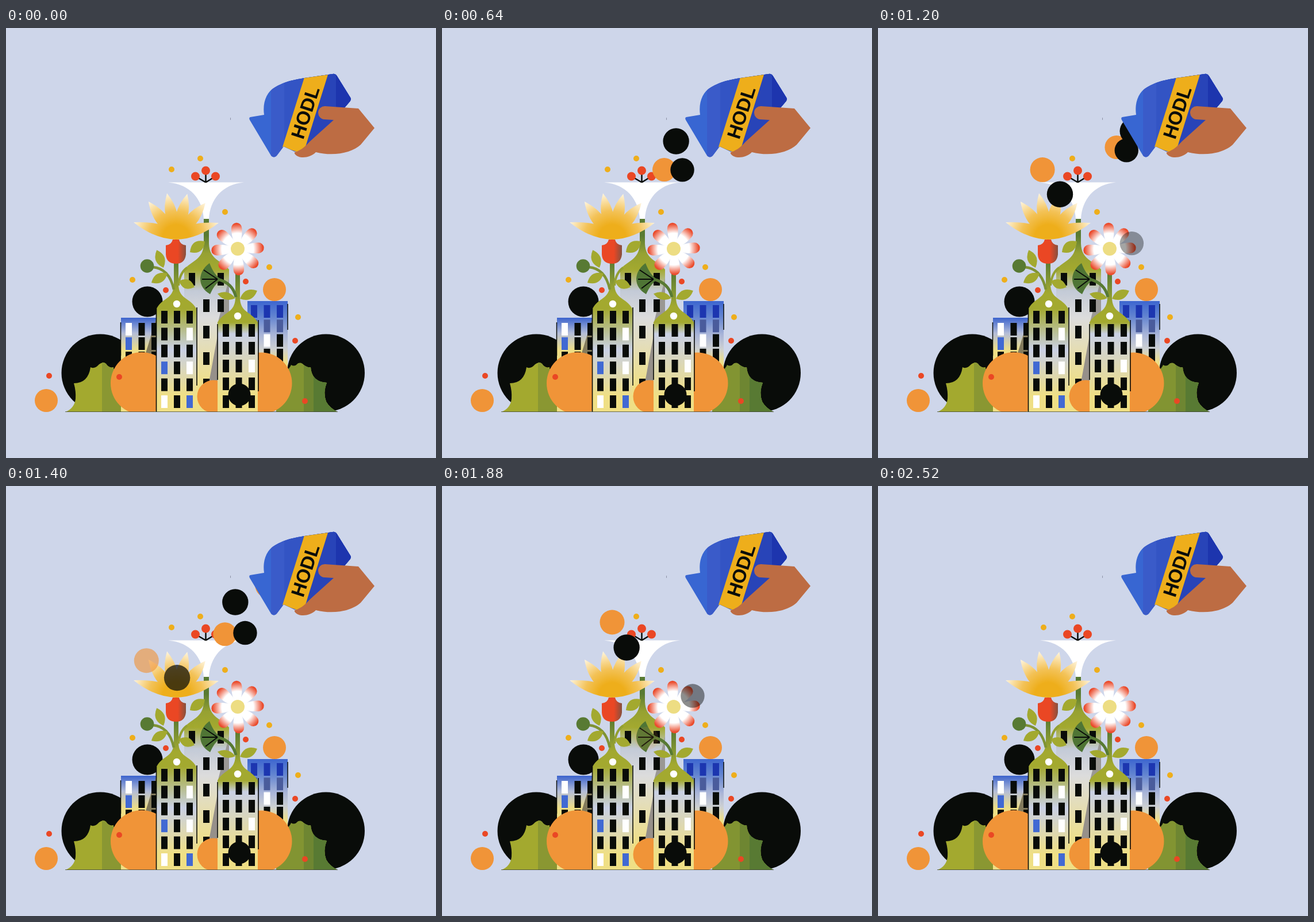
An HTML page that plays this animation: 748x748 px, repeating every 2.64 s.

```html
<!DOCTYPE html>
<html lang="en">
<head>
<meta charset="utf-8">
<title>Growing city</title>
<style>
html, body { margin: 0; width: 100%; height: 100%; overflow: hidden; background: #ced6ea; }
svg { display: block; width: 100vw; height: 100vh; }
text { font: bold 33px "Liberation Sans", Arial, sans-serif; }
</style>
</head>
<body>
<svg viewBox="0 0 748 748">
  <defs>
    <clipPath id="ground"><path d="M0 0H748V668H0Z"/></clipPath>
    <clipPath id="bag"><path d="M425 155L449 151C446 130 453 111 468 103C483 94 500 90 519 87L568 80Q573 79 576 84L599 121Q601 124 598 128L575 155L535 200L518 215Q505 217 498 213L483 206L471 222Q466 227 461 222L424 160Q422 156 425 155Z"/></clipPath>
    <radialGradient id="sun" gradientUnits="userSpaceOnUse" cx="0" cy="0" r="80">
      <stop offset=".3" stop-color="#eeae1b"/><stop offset=".6" stop-color="#f3c257"/><stop offset="1" stop-color="#fff6e0"/>
    </radialGradient>
    <radialGradient id="daisy" gradientUnits="userSpaceOnUse" cx="0" cy="0" r="46">
      <stop offset=".6" stop-color="#fff"/><stop offset=".95" stop-color="#ea4b2c"/>
    </radialGradient>
    <linearGradient id="calyx">
      <stop offset=".6" stop-color="#ea4724"/><stop offset="1" stop-color="#86503f"/>
    </linearGradient>
  </defs>

  <path d="M390.5 156V160" stroke="#8d94a8"/>
  <g id="scene" clip-path="url(#ground)"></g>
  <g id="coins"></g>

  <g clip-path="url(#bag)">
    <path d="M420 70H610V230H420Z" fill="#3866d2"/>
    <path d="M461 70H610V230H461Z" fill="#3a5bc9"/>
    <path d="M484 70H610V230H484Z" fill="#3354c4"/>
    <path d="M540 70H610V230H520Z" fill="#2844b8"/>
    <path d="M574 70H610V230H574Z" fill="#1d35ae"/>
    <path d="M519 86L561 78L517 219L481 207Z" fill="#eeae1b"/>
  </g>
  <text transform="translate(520.5 147) rotate(-72)" y="11.5" text-anchor="middle" fill="#0a0d0a">HODL</text>
  <path d="M555 136L613 140L641 174L617 203C602 217 570 224 539 216C530 225 516 227 507 223Q501 219 502 216C516 212 522 204 530 196L570 160L554 159A11.5 11.5 0 0 1 555 136Z" fill="#bd6c43"/>
</svg>
<script>
const BLACK = '#090c09', WHITE = '#fff', ORANGE = '#f09438', RED = '#ea4724', GOLD = '#eeae1b',
  OLIVE = '#a3a92f', GREEN = '#587a33', BLUE = '#4169d3', NAVY = '#1c36b0', SLATE = '#4a5c9c',
  CREAM = '#efdf85', HAZE = '#c9d0e4';

let art = '';
const path = (d, fill, place = '') => art += `<path d="${d}" fill="${fill}" transform="${place}"/>`;
const line = (d, color, width) => art += `<path d="${d}" fill="none" stroke="${color}" stroke-width="${width}"/>`;
const disc = (x, y, r, fill) => art += `<circle cx="${x}" cy="${y}" r="${r}" fill="${fill}"/>`;
const box = (x, y, w, h, fill) => path(`M${x} ${y}h${w}v${h}h${-w}Z`, fill);

// Vertical gradient from [y, colour] stops.
let fades = 0;
function fade(...stops) {
  const id = 'fade' + fades++, top = stops[0][0], bottom = stops.at(-1)[0];
  art += `<linearGradient id="${id}" gradientUnits="userSpaceOnUse" x1="0" x2="0" y1="${top}" y2="${bottom}">` +
    stops.map(([y, c]) => `<stop offset="${(y - top) / (bottom - top)}" stop-color="${c}"/>`).join('') + '</linearGradient>';
  return `url(#${id})`;
}

// Three columns of windows; paint(column, row) picks the colour, null leaves a gap.
function windows(x, y, dx, dy, rows, paint) {
  for (let i = 0; i < rows * 3; i++) {
    const c = i % 3, r = (i - c) / 3, fill = paint(c, r);
    if (fill) box(x + c * dx, y + r * dy, 11, 22, fill);
  }
}

// Pointed oval with its lower tip at (x, y), turned clockwise from upright.
function leaf(x, y, length, turn, width = 16, fill = OLIVE) {
  path(`M0 0Q${width} ${-length / 2} 0 ${-length}Q${-width} ${-length / 2} 0 0Z`, fill, `translate(${x} ${y}) rotate(${turn})`);
}

// Wall with a neck that flares out of a stem of half-width 4.
function house(x, w, mid, stem, neck, eave, light) {
  path(`M${mid - 4} ${stem}h8V${neck}C${mid + 5} ${eave - 16} ${mid + 24} ${eave - 19} ${x + w} ${eave}V668H${x}V${eave}` +
    `C${mid - 24} ${eave - 19} ${mid - 5} ${eave - 16} ${mid - 4} ${neck}Z`,
    fade([stem, GREEN], [neck, '#8f9d32'], [neck + 15, OLIVE], [eave, OLIVE], [light, HAZE], [640, CREAM]));
}

disc(164, 600, 67.5, BLACK);
disc(556.5, 600, 67.5, BLACK);

// Rear buildings
box(200, 504, 62, 164, fade([504, '#3b63cd'], [531, '#b4bdd8'], [561, CREAM]));
path('M262 504V575H240Z', '#827a5c');
windows(208, 513, 22.5, 25, 3, (c, r) => c ? BLACK : [WHITE, BLUE, BLACK][r]);
line('M199.5 512V570', BLACK, 1.5);
box(420, 475, 70, 120, fade([475, '#3d66d0'], [500, '#5f82d0'], [533, '#a8b4d8'], [558, '#cdd0d2'], [582, CREAM]));
windows(426, 482, 22.5, 25.3, 4, (c, r) => [NAVY, SLATE, c === 1 ? WHITE : BLACK, BLACK][r]);
line('M490 480V525', BLACK, 1.5);

// Bushes and the coins on them
path('M103 668Q119 662 121 645Q122 632 118 618Q143 618 147 590Q154 594 162 585Q168 580 174 584Q179 592 187 590V668Z', OLIVE);
path('M167 582Q171 581 174 584Q179 593 200 595V668H167Z', '#8a9732');
const edge = 'Q532 616 558 617Q551 634 557 650Q563 661 577 668';
path('M470 668V600Q490 600 496 586Q502 590 507 584Q513 580 518 586Q524 591 530 590' + edge + 'Z', '#829432');
path('M518 586Q524 591 530 590' + edge + 'H518Z', '#6e8632');
path('M535 606Q542 616 558 617Q551 634 557 650Q563 661 577 668H535Z', GREEN);
disc(236, 618, 54, ORANGE);
disc(444, 618, 53.5, ORANGE);

// Tower with its funnel and berries
path('M344 330H353V375C354 404 376 405 388 420V668H310V420C322 405 343 404 344 375Z',
  fade([330, GREEN], [361, GREEN], [392, '#96a132'], [420, OLIVE], [457, '#c3cad7'], [504, '#dcdcdc'], [625, CREAM]));
path('M388 435V515H368Z', '#9a9894');
path('M368 535V625L352 622Z', '#96908a');
windows(318, 426, 25, 46, 5, (c, r) => c === (r ? 0 : 1) ? null : BLACK);
disc(361, 641, 28.5, ORANGE);
path('M282 268.5H414C376 272 355 298 353 332H344C342 298 321 272 282 268.5Z', WHITE);
for (const [x, y] of [[329.5, 258], [347.5, 248], [364.5, 258]]) {
  line(`M347.5 268.5L${x} ${y}`, BLACK, 2.5);
  disc(x, y, 7.5, RED);
}
leaf(320, 390, 32, 54, 18);

// Front buildings
disc(246, 476, 26.5, BLACK);
disc(467, 455, 20, ORANGE);
house(262, 69, 296, 405, 447, 488, 560);
windows(270, 492, 22, 29.4, 6, (c, r) => r % 2 && c !== 1 && c + r > 2 ? (c === r - 3 ? BLUE : WHITE) : BLACK);
line('M261.5 488V668M332 486V622', BLACK, 1.6);
disc(297, 480, 6.2, WHITE);
house(368, 70, 403, 425, 470, 512, 532);
windows(377, 515, 22.5, 31, 5, (c, r) => c === 2 && r === 2 ? WHITE : BLACK);
line('M368 515V612M439 508V632', BLACK, 1.6);
disc(403, 501, 6.2, WHITE);
disc(406, 638, 19.5, BLACK);
disc(70, 648, 20, ORANGE);

// Twigs and leaves
line('M255 416Q284 418 292 455', '#7f9334', 4.5);
line('M300 448Q302 426 315 417', '#93a032', 4);
disc(245.5, 414, 11.8, GREEN);
leaf(274, 417, 33, -21);
leaf(253, 443, 32, 60);
leaf(301, 440, 29, 112);
leaf(407, 471, 33, 65);
leaf(399, 470, 32, -76, 13);
line('M368 437Q394 443 400 468', GREEN, 5);
path('M354 409Q362 430 374 437Q362 447 355 463Q338 453 338 436Q339 420 354 409Z', '#4f7535');
line('M368 437L344 421M368 437L341 437M368 437L347 453', BLACK, 2);

// Yellow flower
for (let i = 0; i < 4; i++) leaf(296, 366, 80, i * 25.5 - 37, 21, 'url(#sun)');
path('M-74 -28Q-28 -30 0 -14Q28 -30 74 -27Q38 1 0 2Q-38 1 -74 -28Z', 'url(#sun)', 'translate(296 366)');
path('M290 368H301Q303 377 313 378V394Q311 410 296 410Q279 410 278 394V378Q288 377 290 368Z', 'url(#calyx)');

// Daisy
for (let i = 0; i < 8; i++)
  path('M0 0C-8 -14 -9.5 -26 -9.3 -36A9.3 9.8 0 0 1 9.3 -36C9.5 -26 8 -14 0 0Z', 'url(#daisy)', `translate(403 384.5) rotate(${i * 45 - 3})`);
disc(403, 384, 12, '#eddd83');

// Pollen
const pollen = (fill, ...spots) => spots.forEach(([x, y]) => disc(x, y, 5, fill));
pollen(GOLD, [338, 227], [288, 246], [381, 320], [220, 438], [458, 416], [508, 503]);
pollen(RED, [278, 456], [417, 441], [503, 544], [197, 607], [75, 605], [520, 649]);
line('M103 667.6H577', '#3a3f30', .8);
document.getElementById('scene').innerHTML = art;

// Coins leave the bag's mouth with a velocity and a pull, per 100 ms; delay and life in ms.
const MOUTH = { x: 463, y: 172 }, LOOP = 2640, STEP = 40, FADE = .4;
const THROWS = [
  { fill: ORANGE, r: 20.5, delay: 280, life: 920, vx: -27.5, vy: 14, ax: 1.74, ay: 1.86 },
  { fill: BLACK, r: 20.7, delay: 280, life: 1080, vx: -19, vy: 20, ax: 1.81, ay: .22 },
  { fill: ORANGE, r: 21.5, delay: 660, life: 980, vx: -41.4, vy: 3, ax: 1.6, ay: 2 },
  { fill: BLACK, r: 22.7, delay: 400, life: 1400, vx: -25.4, vy: 8.6, ax: .886, ay: .756 }
];

const layer = document.getElementById('coins');
const coins = [0, 720].flatMap(start => THROWS.map(coin => {
  const el = document.createElementNS('http://www.w3.org/2000/svg', 'circle');
  el.setAttribute('fill', coin.fill);
  el.setAttribute('r', coin.r);
  layer.append(el);
  return { ...coin, el, start: start + coin.delay };
}));

const origin = performance.now();
function draw() {
  const now = Math.floor((performance.now() - origin) % LOOP / STEP) * STEP;
  for (const { el, start, life, vx, vy, ax, ay } of coins) {
    const age = now - start, s = age / 100;
    const opacity = age < 0 ? 0 : (1 - age / life) / FADE;
    el.setAttribute('opacity', Math.min(1, Math.max(0, opacity)));
    el.setAttribute('cx', MOUTH.x + vx * s + ax * s * s);
    el.setAttribute('cy', MOUTH.y + vy * s + ay * s * s);
  }
  requestAnimationFrame(draw);
}
draw();
</script>
</body>
</html>
```
